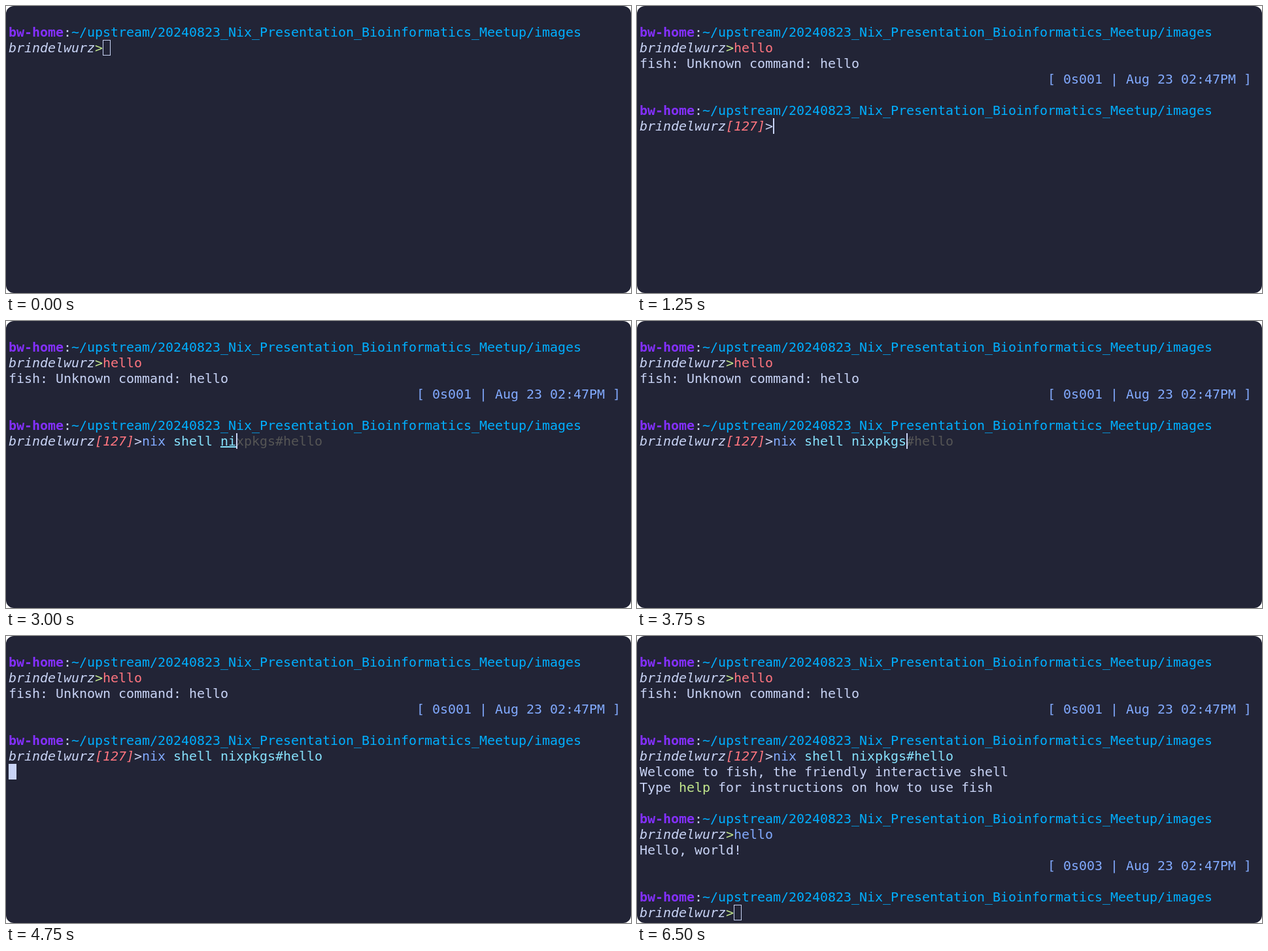
An HTML page that plays this animation: 956x440 px, repeating every 8000 ms.

```html
<!DOCTYPE html>
<html lang="en">
<head>
<meta charset="utf-8">
<title>Terminal session</title>
<style>
  html, body { margin: 0; width: 100%; height: 100%; overflow: hidden; background: #fff; }
  svg { display: block; width: 100%; height: 100%; }
  text { font: 20px "DejaVu Sans Mono", monospace; white-space: pre; fill: #c8d3f5; }
  .host { fill: #8430ff; font-weight: bold; }
  .path { fill: #00afff; }
  .user { font-style: italic; }
  .ok { fill: #c3e88d; }
  .bad { fill: #ff757f; }
  .status { fill: #ff757f; font-style: italic; }
  .cmd { fill: #82aaff; }
  .arg { fill: #86e1fc; }
  .file { fill: #86e1fc; text-decoration: underline; }
  .hint { fill: #555; }
</style>
</head>
<body>
<svg viewBox="0 0 956 440">
  <rect width="956" height="440" rx="12" fill="#222436"/>
  <g id="screen"></g>
  <rect id="cursor"/>
</svg>
<script>
const STEP = 250, LOOP = 8000;
const CELL = 12, LINE = 24, LEFT = 4, TOP = 28;
const HOST = "bw-home", USER = "brindelwurz";
const PATH = "~/upstream/20240823_Nix_Presentation_Bioinformatics_Meetup/images";
const SHELL = "nix shell nixpkgs#hello";
// Characters of SHELL typed at each step, from 1250 ms on
const TYPED = [0, 0, 1, 2, 4, 7, 9, 12, 13, 15, 17, 19, 21, 23];

const screen = document.getElementById("screen");
const cursor = document.getElementById("cursor");

function print(row, col, parts) {
  const line = document.createElementNS(screen.namespaceURI, "text");
  line.setAttribute("y", TOP + row * LINE + 19);
  for (const [str, cls = ""] of parts) {
    const span = document.createElementNS(screen.namespaceURI, "tspan");
    span.setAttribute("x", [...str].map((_, i) => LEFT + (col + i) * CELL).join(" "));
    span.setAttribute("class", cls);
    span.textContent = str;
    line.append(span);
    col += str.length;
  }
  screen.append(line);
}

function prompt(row, failed, input = []) {
  print(row, 0, [[HOST, "host"], [":"], [PATH, "path"]]);
  const mark = failed ? [["[127]", "status"], [">"]] : [[">", "ok"]];
  print(row + 1, 0, [[USER, "user"], ...mark, ...input.filter(p => p[0])]);
}

const timing = (row, secs) => print(row, 52, [[`[ ${secs} | Aug 23 02:47PM ]`, "cmd"]]);

function setCursor(kind, row = 0, col = 0) {
  const hollow = kind === "hollow", inset = hollow ? 0.5 : 0;
  const attrs = {
    x: LEFT + col * CELL + inset,
    y: TOP + row * LINE + inset,
    width: kind === "beam" ? 2 : CELL - 2 * inset,
    height: LINE - 2 * inset,
    fill: hollow ? "none" : "#c8d3f5",
    stroke: hollow ? "#c8d3f5" : "none",
    visibility: kind === "none" ? "hidden" : "visible"
  };
  for (const name in attrs) cursor.setAttribute(name, attrs[name]);
}

function helloInput(n, known) {
  return [["hello".slice(0, n), known && n === 5 ? "cmd" : "bad"],
          [n ? "hello".slice(n) : "", "hint"]];
}

function shellInput(n) {
  const done = SHELL.slice(0, n), target = done.slice(10);
  return [[done.slice(0, 3), n < 3 ? "bad" : "cmd"],
          [done.slice(3, 10), "arg"],
          [target, target.length < 4 ? "file" : "arg"],
          [n ? SHELL.slice(n) : "", "hint"]];
}

function draw(step) {
  screen.replaceChildren();

  const first = Math.min(5, Math.max(0, step * 2 - 1));
  prompt(0, false, helloInput(first, false));
  if (step < 4) return setCursor(step ? "beam" : "hollow", 1, 12 + first);

  print(2, 0, [["fish: Unknown command: hello"]]);
  if (step < 5) return setCursor("block", 3, 0);

  timing(3, "0s001");
  const typed = TYPED[Math.min(step - 5, TYPED.length - 1)];
  prompt(5, true, shellInput(typed));
  if (step < 19) return setCursor("beam", 6, 17 + typed);
  if (step < 20) return setCursor("block", 7, 0);

  print(7, 0, [["Welcome to fish, the friendly interactive shell"]]);
  print(8, 0, [["Type "], ["help", "ok"], [" for instructions on how to use fish"]]);
  const second = Math.min(5, Math.max(0, (step - 20) * 2 - 1));
  prompt(10, false, helloInput(second, true));
  if (step < 24) return setCursor("beam", 11, 12 + second);

  print(12, 0, [["Hello, world!"]]);
  if (step < 25) return setCursor("none");

  timing(13, "0s003");
  prompt(15, false);
  setCursor(step < 26 ? "beam" : "hollow", 16, 12);
}

let shown = -1;
function tick() {
  const step = Math.floor(performance.now() % LOOP / STEP);
  if (step !== shown) draw(shown = step);
  requestAnimationFrame(tick);
}
tick();
</script>
</body>
</html>
```
